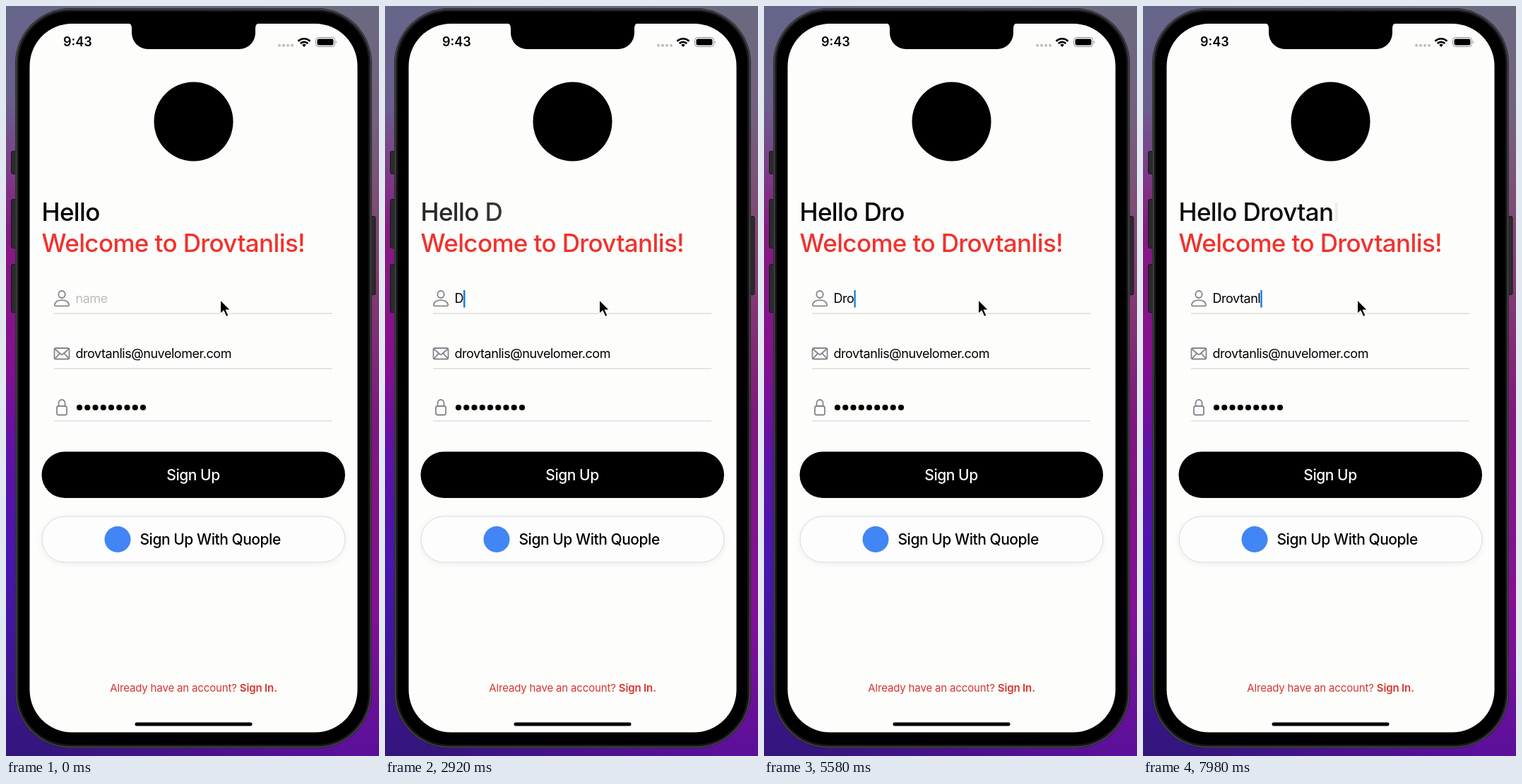
Recreate the animation shown at these times as an HTML page. Size 528 by 1061 pixels, loop 8 s.

```html
<!DOCTYPE html>
<html lang="en">
<head>
<meta charset="utf-8">
<title>Sign up form</title>
<style>
  html, body { margin: 0; width: 100%; height: 100%; overflow: hidden; background: #66668a; }
  svg { display: block; width: 528px; height: 1061px; }
  text { font-family: Inter, Roboto, "Liberation Sans", sans-serif; white-space: pre; }
  .title { font-size: 35px; font-weight: 500; letter-spacing: -.018em; }
  .field { font-size: 18px; letter-spacing: -.025em; }
  .button { font-size: 21px; font-weight: 500; letter-spacing: -.022em; }
  .foot { font-size: 15px; letter-spacing: -.01em; fill: #d8342e; }
  .clock { font-size: 18px; font-weight: 600; }
  .icon { fill: none; stroke: #85858c; stroke-width: 1.8; stroke-linecap: round; stroke-linejoin: round; }
</style>
</head>
<body>
<svg viewBox="0 0 528 1061">
  <defs>
    <linearGradient id="left" x2="0" y2="1">
      <stop offset="0" stop-color="#66668a"/>
      <stop offset=".13" stop-color="#6a5f8c"/>
      <stop offset=".21" stop-color="#7c4088"/>
      <stop offset=".3" stop-color="#861a80"/>
      <stop offset=".48" stop-color="#840f90"/>
      <stop offset=".6" stop-color="#5d12a8"/>
      <stop offset=".75" stop-color="#4716ae"/>
      <stop offset="1" stop-color="#34157c"/>
    </linearGradient>
    <linearGradient id="right" x2="0" y2="1">
      <stop offset="0" stop-color="#6a6a80"/>
      <stop offset=".15" stop-color="#75607f"/>
      <stop offset=".35" stop-color="#84406f"/>
      <stop offset=".55" stop-color="#80187f"/>
      <stop offset=".8" stop-color="#860f98"/>
      <stop offset="1" stop-color="#5a109a"/>
    </linearGradient>
    <linearGradient id="across">
      <stop offset=".1" stop-color="#000"/>
      <stop offset=".9" stop-color="#fff"/>
    </linearGradient>
    <mask id="blend"><rect width="528" height="1061" fill="url(#across)"/></mask>
    <filter id="soft" x="-10%" y="-30%" width="120%" height="170%">
      <feDropShadow dx="0" dy="2" stdDeviation="4" flood-color="#000" flood-opacity=".06"/>
    </filter>
  </defs>

  <rect width="528" height="1061" fill="url(#left)"/>
  <rect width="528" height="1061" fill="url(#right)" mask="url(#blend)"/>

  <!-- phone -->
  <g fill="#2b2a2d" stroke="#18171a">
    <rect x="7.5" y="205.5" width="8" height="32" rx="2"/>
    <rect x="7.5" y="273.5" width="8" height="69" rx="2"/>
    <rect x="7.5" y="365.5" width="8" height="68" rx="2"/>
    <rect x="514" y="297.5" width="9" height="111" rx="2"/>
  </g>
  <rect x="13" y="3" width="505" height="1047" rx="78" fill="#18181a"/>
  <rect x="14.5" y="4.5" width="502" height="1044" rx="76.5" fill="none" stroke="#434345" stroke-width="2"/>
  <rect x="18" y="8" width="495" height="1037" rx="73"/>
  <rect x="33.5" y="25" width="464" height="1002.5" rx="60" fill="#fdfdfc"/>
  <path d="M172 24q6 1 6 7v7a23 23 0 0 0 23 23h129a23 23 0 0 0 23-23v-7q0-6 6-7z"/>
  <rect x="182.5" y="1013.5" width="166" height="5" rx="2.5"/>

  <!-- status bar -->
  <text class="clock" x="81" y="57">9:43</text>
  <path d="M387 55.7h.01m6 0h.01m6 0h.01m6 0h.01" stroke="#bdbdbf" stroke-width="4" stroke-linecap="round"/>
  <g fill="none" stroke="#000" stroke-width="2.7">
    <path d="M413.5 49.7a12.2 12.2 0 0 1 17 0"/>
    <path d="M416.7 53a7.6 7.6 0 0 1 10.6 0"/>
  </g>
  <path d="M422 58l-2.8-2.9a4 4 0 0 1 5.6 0z"/>
  <rect x="438.5" y="44.5" width="27" height="13" rx="4" fill="none" stroke="#8d8d8f"/>
  <rect x="440.5" y="46.5" width="23" height="9" rx="2.3"/>
  <path d="M467 49q2 2 0 4z" fill="#8d8d8f"/>

  <circle cx="265.5" cy="163.5" r="56"/>

  <text class="title hello" x="50.5" y="304"></text>
  <text class="title hello" x="50.5" y="304"></text>
  <text class="title" x="50.5" y="348" fill="#f0322d">Welcome to Drovtanlis!</text>

  <!-- form -->
  <path d="M68 435h394M68 513h394" stroke="#cdcdbf"/>
  <path d="M68 587h394" stroke="#cfcfdc"/>
  <g class="icon">
    <ellipse cx="79" cy="408" rx="4.7" ry="5"/>
    <path d="M70.5 424.3q-2 0-1.6-2.3c2.500-7.700 17.700-7.700 20.200 0q.4 2.300-1.600 2.300z"/>
    <rect x="68.500" y="484" width="21" height="15.500" rx="2"/>
    <path d="M69 485l8.500 7.500q1.500 1.200 3 0l8.500-7.500M69.500 498.700l6.500-7m13 7l-6.500-7"/>
    <rect x="72" y="566" width="14" height="12.500" rx="2.500"/>
    <path d="M74.500 566v-4.500a4.500 4.500 0 0 1 9 0v4.500"/>
  </g>
  <text class="field" id="name" x="98.500" y="420"></text>
  <rect id="caret" y="402" width="2.400" height="24.500" fill="#1479e6"/>
  <text class="field" x="98.500" y="498">drovtanlis@nuvelomer.com</text>
  <path d="M104 568h90.500" stroke="#000" stroke-width="8.200" stroke-linecap="round" stroke-dasharray="0 11.250"/>

  <rect x="50.500" y="630.500" width="429.500" height="65.500" rx="32.700"/>
  <text class="button" x="265" y="671" text-anchor="middle" fill="#fff">Sign Up</text>
  <rect x="51" y="722" width="429" height="65" rx="32.500" fill="#fdfdfd" stroke="#d6d6e0" filter="url(#soft)"/>
  <circle cx="158" cy="754.500" r="18.500" fill="#4285f4"/>
  <text class="button" x="189.500" y="762">Sign Up With Quople</text>

  <text class="foot" x="265.500" y="970" text-anchor="middle">Already have an account? <tspan font-weight="600">Sign In.</tspan></text>

  <path d="M303.300 415.500v20.300l4.700-4.400 3.700 8.200 3.500-1.600-3.600-7.700h6.400z" stroke="#fff" stroke-width="1.400"/>
</svg>

<script>
  const LOOP = 8000, FADE = 350, FOCUS = 950;
  const word = "Drovtanlis";
  const keys = [2675, 3630, 4670, 5700, 6230, 6770, 7350, 7930];
  const [before, after] = document.querySelectorAll(".hello");
  const nameText = document.getElementById("name");
  const caret = document.getElementById("caret");

  const clamp = v => Math.max(0, Math.min(1, v));
  const ease = v => v * v * (3 - 2 * v);

  function setText(el, text) {
    if (el.textContent !== text) el.textContent = text;
  }

  // Solid, fade out, hidden, fade in over one second
  function blink(ms) {
    const p = ms % 1000;
    return p < 600 ? clamp((600 - p) / 150) : clamp((p - 750) / 170);
  }

  function draw(t) {
    const count = keys.filter(k => k <= t).length;
    const last = count ? keys[count - 1] : FOCUS;
    const mix = count ? ease(clamp((t - last) / FADE)) : 1;
    const typed = word.slice(0, count);

    setText(before, "Hello " + word.slice(0, Math.max(0, count - 1)));
    setText(after, "Hello " + typed);
    before.style.opacity = 1 - mix;
    after.style.opacity = mix;

    setText(nameText, typed || "name");
    nameText.style.fill = count ? "#000" : "#bcbcb8";
    caret.setAttribute("x", 98.5 + (count ? nameText.getComputedTextLength() : 0));
    caret.style.opacity = t < FOCUS ? 0 : blink(t - last);
  }

  const start = performance.now();
  function tick() {
    draw((performance.now() - start) % LOOP);
    requestAnimationFrame(tick);
  }
  tick();
</script>
</body>
</html>
```
